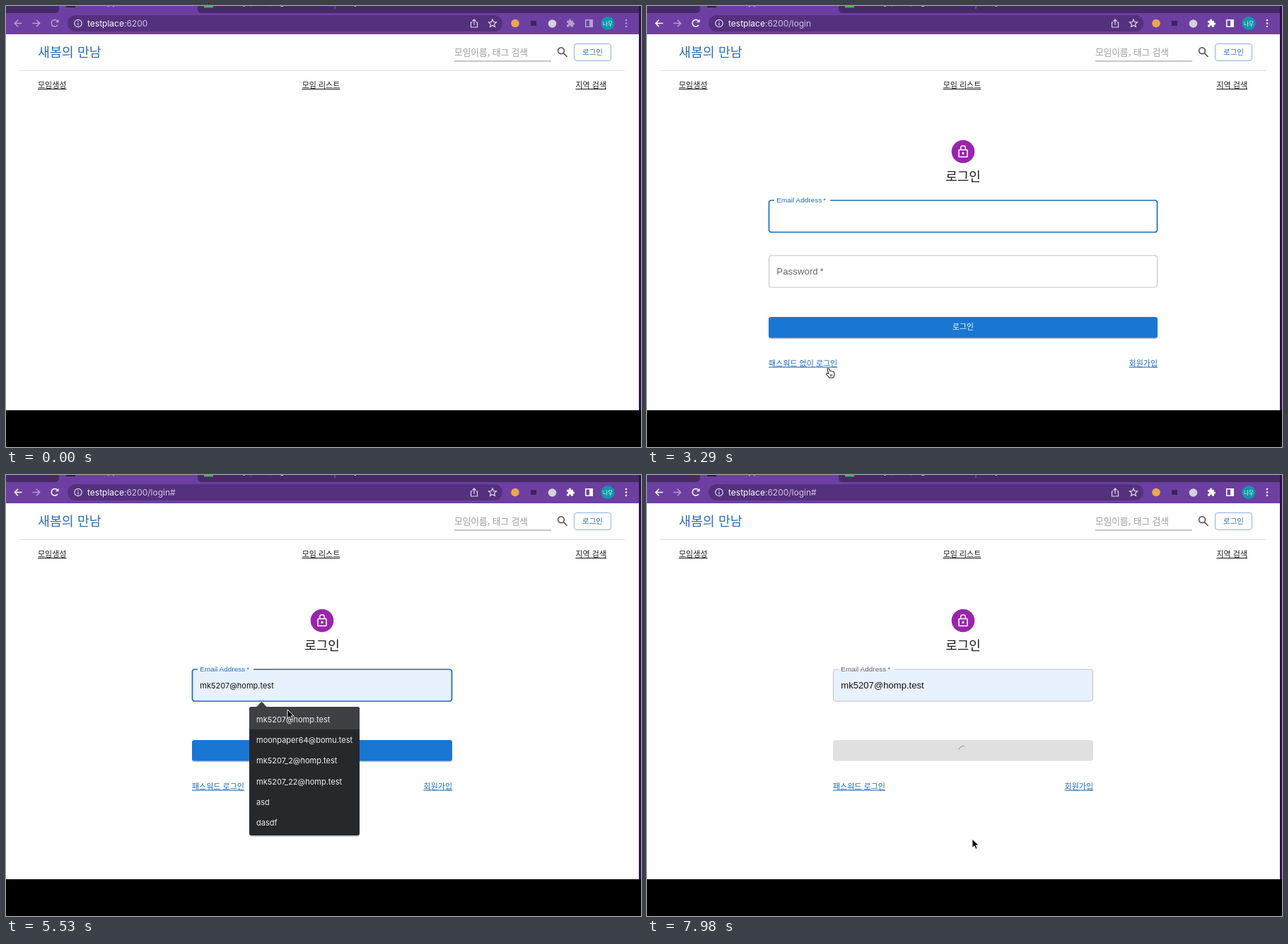
Write an HTML page that moves like this. It is 898 px wide and 624 px high and loops after 8 s.

```html
<!DOCTYPE html>
<html lang="ko">
<head>
<meta charset="utf-8">
<title>Login flow</title>
<style>
  html, body { margin: 0; width: 100%; height: 100%; overflow: hidden; background: #000; }
  svg { display: block; }
  text { font-family: 'Noto Sans CJK KR', 'Noto Sans CJK JP', 'Noto Sans CJK', sans-serif; white-space: pre; }
  .ui { font-family: Inter, sans-serif; }
  .form { font-family: 'Liberation Sans', sans-serif; }
  .line { fill: none; stroke: #fff; stroke-width: 1.5; }
</style>
</head>
<body>
<svg width="898" height="624" viewBox="0 0 898 624">
  <rect width="898" height="572" fill="#2f1150"/>
  <rect width="895" height="572" fill="#fff"/>

  <!-- browser window -->
  <rect width="895" height="40" fill="#6d3fa2"/>
  <path d="M0 0H75V4Q75 10 69 10H0ZM271 0H895V10H277Q271 10 271 4Z" fill="#462a68"/>
  <path d="M465 0V4" stroke="#8a6cab"/>
  <g class="ui" font-size="12" fill="#e6dcf0">
    <text class="ui" x="104" y="-1">Main App</text>
    <text class="ui" x="300" y="-2">Weekly plan page</text>
    <text class="ui" x="481" y="-2">My notes</text>
  </g>
  <rect x="280" y="-10" width="13" height="12.5" fill="#3fae5a"/>
  <rect x="87" y="13" width="615" height="23" rx="11.5" fill="#54307e"/>
  <g class="line" style="stroke-width:1.2;stroke:#e4d9ef">
    <circle cx="102" cy="24.5" r="5.2"/>
    <path d="M102 23.5V27.5M102 21V22.3"/>
    <path d="M659.5 23H657.5V30H666.5V23H664.500M662 27V19.500M659.500 21.500L662 19L664.500 21.500"/>
    <path d="M688 19L689.600 22.700L693.500 23L690.500 25.600L691.500 29.500L688 27.400L684.500 29.500L685.500 25.600L682.500 23L686.400 22.700Z"/>
  </g>
  <circle cx="720" cy="24.5" r="5.8" fill="#e9a94a"/>
  <rect x="742" y="21" width="8" height="7" fill="#3d235c"/>
  <circle cx="772.500" cy="25" r="5.800" fill="#d5d1da"/>
  <circle cx="851" cy="24.500" r="9.500" fill="#0d98aa"/>
  <text x="851" y="27.500" font-size="7.500" fill="#fff" text-anchor="middle">나무</text>

  <!-- page header -->
  <text x="45" y="72" font-size="18.400" fill="#2a6db8">새봄의 만남</text>
  <text x="634" y="69.500" font-size="12.700" fill="#9c9c9c">모임이름, 태그 검색</text>
  <path d="M634 78H771" stroke="#8e8e8e"/>
  <g fill="none" stroke="#5f5f5f" stroke-width="1.800">
    <circle cx="785" cy="63.300" r="4.400"/><path d="M788.300 66.600L793.500 71.800"/>
  </g>
  <rect x="803.500" y="53.500" width="52" height="24" rx="3.500" fill="none" stroke="#8fb3dc"/>
  <text x="829.500" y="69" font-size="10.500" fill="#2a6db8" text-anchor="middle">로그인</text>
  <path d="M19 91.500H875" stroke="#dedede"/>
  <g font-size="11" fill="#1c1c1c" text-decoration="underline">
    <text x="45" y="116">모임생성</text>
    <text x="445.500" y="116" text-anchor="middle">모임 리스트</text>
    <text x="849" y="116" text-anchor="end">지역 검색</text>
  </g>
  <g id="scene"></g>
</svg>
<script>
const LOOP = 8000;
const T = { activate: 70, navigate: 1190, page: 1680, focus: 1740, loaded: 1960, swap: 3640,
  focusEmail: 4690, menu: 4760, pick: 5670, submit: 6860 };
const BLUE = '#1f6bb5', GREY = '#666';
const EMAILS = ['mk5207@homp.test', 'moonpaper64@bomu.test', 'mk5207_2@homp.test', 'mk5207_22@homp.test', 'asd', 'dasdf'];

// Pointer stops: time, x, y
const STOPS = [
  [700, 900, 560], [1050, 835, 60], [2240, 835, 60], [3010, 255, 529], [3290, 256, 512],
  [4130, 256, 512], [4410, 403, 299], [5040, 403, 299], [5320, 402, 334], [5530, 398, 332],
  [6020, 398, 332], [6370, 433, 368], [6790, 452, 391], [7000, 452, 391], [7600, 460, 515]
];

const clamp = v => Math.max(0, Math.min(1, v));
const progress = (t, start, length) => clamp((t - start) / length);
const smooth = p => p * p * (3 - 2 * p);
const inside = (p, x, y, w, h) => p.x >= x && p.x <= x + w && p.y >= y && p.y <= y + h;

function pointerAt(t) {
  let i = STOPS.findIndex(s => s[0] > t);
  if (i < 0) i = STOPS.length;
  if (i === 0) return { x: -50, y: -50 };
  const a = STOPS[i - 1], b = STOPS[i] || a;
  const p = smooth(progress(t, a[0], b[0] - a[0] || 1));
  return { x: a[1] + (b[1] - a[1]) * p, y: a[2] + (b[2] - a[2]) * p };
}

function label(text, x, y, size, fill, extra = '') {
  return `<text x="${x}" y="${y}" font-size="${size}" fill="${fill}" ${extra}>${text}</text>`;
}

function pointer(p, shape) {
  const art = {
    arrow: '<path d="M0 0V12.500L2.900 9.800L5 14.300L7.100 13.300L5 9H9Z" fill="#000" stroke="#fff" stroke-width=".9"/>',
    hand: `<path d="M-1 1.200Q0-.300 1.300 1L3.300 5Q4.400 3.900 5.300 5Q6.700 4.200 7.300 5.600Q8.600 5.200 8.900 6.600
      L9 10Q8.600 12 7.600 14H1.800L-2.300 9.300Q-3.200 7.600-1.500 7.500L.700 8.600Z" fill="#fff" stroke="#000" stroke-linejoin="round"/>
      <path d="M3.500 9V12M5.500 9V12" stroke="#000" stroke-width=".8"/>`,
    text: '<path d="M-3-6Q0-6 0-4Q0-6 3-6M0-4V4M-3 6Q0 6 0 4Q0 6 3 6M-1.500 2H1.500" fill="none" stroke="#000" stroke-width="1.200"/>'
  };
  return `<g transform="translate(${p.x} ${p.y})">${art[shape]}</g>`;
}

function toolbar(t) {
  const lit = .5 + .5 * progress(t, T.activate, 210);
  const loading = t >= T.navigate && t < T.loaded;
  const path = t < T.navigate ? '' : t < T.swap ? '/login' : '/login#';
  const reload = loading
    ? '<path d="M64.500 20L73.500 29M73.500 20L64.500 29"/>'
    : '<path d="M73 27A4.800 4.800 0 1 1 73 21.500"/><path d="M74.500 18.800V23.300H70Z" fill="#fff" stroke="none"/>';
  const tabIcon = loading
    ? `<circle cx="91" cy="-3.500" r="5.500" class="line" style="stroke:#8fb4e8" stroke-dasharray="24 11" transform="rotate(${t * .36 % 360} 91 -3.500)"/>`
    : '<rect x="85" y="-9" width="13" height="11" rx="1" fill="#25212c"/>';
  return `${tabIcon}
    <g class="line">
      <path d="M22.500 24.500H12.500M17 19.800L12.300 24.500L17 29.200" opacity="${t < T.navigate ? .5 : 1}"/>
      <path d="M37.500 24.500H47.500M43 19.800L47.700 24.500L43 29.200" opacity=".5"/>
      <g opacity="${lit}">${reload}</g>
    </g>
    <g opacity="${lit}" fill="#fff">
      <path transform="translate(792 18) scale(.53)" d="M20.500 11H19V7c0-1.100-.9-2-2-2h-4V3.500a2.500 2.500 0 0 0-5 0V5H4c-1.100 0-2 .9-2 2v3.800h1.500a2.700 2.700 0 0 1 0 5.400H2V20c0 1.100.9 2 2 2h3.800v-1.500a2.700 2.700 0 0 1 5.400 0V22H17c1.100 0 2-.9 2-2v-4h1.500a2.500 2.500 0 0 0 0-5z"/>
      <path d="M819 19H830V30H819ZM820.500 20.500V28.500H825V20.500Z" fill-rule="evenodd"/>
      <circle cx="877" cy="20" r="1.300"/><circle cx="877" cy="24.500" r="1.300"/><circle cx="877" cy="29" r="1.300"/>
    </g>
    <text class="ui" x="115" y="28.700" font-size="12" fill="#fff">testplace<tspan fill="#d3c4e2">:6200${path}</tspan></text>`;
}

// Outlined input whose label floats into a notch as shrink goes 0 to 1
function field(f) {
  const { x, y, w, name, shrink = 0, focused, hover, notch = 79, fill = '#fff' } = f;
  const r = 3.3, h = 45, top = y + .5, left = x + .5, right = x + w - .5;
  const start = x + 8, size = 13.1 * (1 - .25 * shrink);
  const stroke = focused ? BLUE : hover ? '#222' : '#c0c0c4';
  const d = `M${start + notch * shrink} ${top}H${right - r}a${r} ${r} 0 0 1 ${r} ${r}V${top + h - r}a${r} ${r} 0 0 1 ${-r} ${r}
    H${left + r}a${r} ${r} 0 0 1 ${-r} ${-r}V${top + r}a${r} ${r} 0 0 1 ${r} ${-r}H${start}`;
  return `<path d="${d}" fill="${fill}" stroke="${stroke}" stroke-width="${focused ? 1.7 : 1}"/>` +
    label(name + '\u2009*', x + 11.3, y + 27.3 - 23.5 * shrink, size,
      focused && shrink > .5 ? BLUE : GREY, `class="form" letter-spacing="${size * .0094}"`);
}

function caret(t, since, x) {
  return t >= since && (t - since) % 1000 < 500 ? `<path d="M${x} 290V305" stroke="#111"/>` : '';
}

function spinner(t, cx, cy) {
  const p = (t - T.submit + 14) / 1400 % 1, round = 126.9;
  const e = smooth(p < .5 ? p * 2 : p * 2 - 1);
  const from = p < .5 ? 15 * e : 15 + 110 * e;
  const dash = Math.min(p < .5 ? 1 + 99 * e : 100, round - from);
  return `<circle r="20.200" fill="none" stroke="#a9a9a9" stroke-width="3.600" stroke-dasharray="${dash} 200"
    stroke-dashoffset="${-from}" transform="translate(${cx} ${cy}) scale(.3) rotate(${p * 360})"
    ${''}/>`.replace(`stroke-dashoffset="${-from}" transform="`, `transform="`)
    .replace(`rotate(${p * 360})`, `rotate(${p * 360 + from / round * 360})`);
}

function button(x, y, w, hover) {
  return `<rect x="${x}" y="${y + 1.5}" width="${w}" height="29.500" rx="3.300" fill="#000" opacity=".25"/>
    <rect x="${x}" y="${y}" width="${w}" height="29.500" rx="3.300" fill="${hover ? '#1565c0' : '#1976d2'}"/>` +
    label('로그인', 447, y + 18.3, 10.8, '#fff', 'text-anchor="middle"');
}

function link(text, x, y, anchor, hover) {
  const line = hover ? BLUE : '#9dbfe4';
  return label(text, x, y, 11, BLUE, `text-anchor="${anchor}" style="text-decoration:underline ${line}"`);
}

function suggestions(row) {
  const items = EMAILS.map((mail, i) => label(mail, 354, 349.5 + i * 29.35, 11, '#f1f1f1', 'class="ui"')).join('');
  const lit = row ? '<path d="M344 331a3 3 0 0 1 3-3H497a3 3 0 0 1 3 3V360H344Z" fill="#3e4043"/>' : '';
  return `<rect x="344" y="329" width="156" height="183" rx="4" fill="#000" opacity=".2"/>
    <path d="M354 328.500L360 322Q361.500 320.500 363 322L369 328.500Z" fill="#3e4043"/>
    <rect x="344" y="328" width="156" height="182" rx="3" fill="#26292c"/>${lit}${items}`;
}

function loginPage(t, p) {
  const short = t >= T.swap;
  const x = short ? 263 : 172, w = short ? 368 : 550;
  const buttonY = short ? 375 : 440, linkY = buttonY + 70;
  const overEmail = inside(p, x, 275, w, 45);
  const overPassword = !short && inside(p, x, 353, w, 45);
  const overButton = inside(p, x, buttonY, w, 30) && t < T.submit;
  const overLink = inside(p, x, linkY - 11, short ? 73 : 97, 14);
  const focusTime = short ? T.focusEmail : T.focus;
  const focused = t >= focusTime && t < T.submit;
  const menuOpen = t >= T.menu && t < T.pick;
  const preview = menuOpen && p.y >= 328;
  const filled = t >= T.pick;

  let out = `<circle cx="447" cy="206" r="16.300" fill="#9825ac"/>
    <g class="line" style="stroke-width:1.600">
      <rect x="441" y="203.500" width="12" height="10" rx=".8"/>
      <path d="M443.700 203.500V201a3.300 3.300 0 0 1 6.600 0V203.500"/>
      <circle cx="447" cy="208.500" r=".9" fill="#fff"/>
    </g>` + label('로그인', 447, 247.5, 18, '#1c1c1c', 'text-anchor="middle"');

  out += field({ x, y: 274.5, w, name: 'Email Address', focused, hover: overEmail,
    shrink: smooth(progress(t, focusTime, 200)), fill: preview || filled ? '#e8f1fe' : '#fff' });
  if (filled) out += label(EMAILS[0], 274.3, 302, 13.1, '#111', 'class="form"');
  else if (preview) out += label(EMAILS[0], 274.3, 302, 11, '#111', 'class="ui"');
  else out += caret(t, focusTime, x + 11.5);

  if (!short) out += field({ x, y: 352.5, w, name: 'Password', hover: overPassword });
  out += t < T.submit ? button(x, buttonY, w, overButton)
    : `<rect x="${x}" y="375" width="${w}" height="29.500" rx="3.300" fill="#e0e0e0"/>` + spinner(t, 447, 389.7);
  out += link(short ? '패스워드 로그인' : '패스워드 없이 로그인', x, linkY - .5, 'start', overLink);
  out += link('회원가입', x + w, linkY - .5, 'end');
  if (menuOpen) out += suggestions(preview);

  const overMenu = menuOpen && p.y >= 321;
  const shape = overMenu ? 'arrow' : overEmail || overPassword ? 'text' : overButton || overLink ? 'hand' : 'arrow';
  return { out, shape };
}

const scene = document.getElementById('scene');

function draw(now) {
  const t = now % LOOP, p = pointerAt(t);
  const page = t >= T.page ? loginPage(t, p) : { out: '', shape: 'arrow' };
  const shape = inside(p, 803, 53, 53, 25) ? 'hand' : page.shape;
  scene.innerHTML = toolbar(t) + page.out + pointer(p, shape) + '<rect y="572" width="898" height="52"/>';
  requestAnimationFrame(draw);
}
requestAnimationFrame(draw);
</script>
</body>
</html>
```
